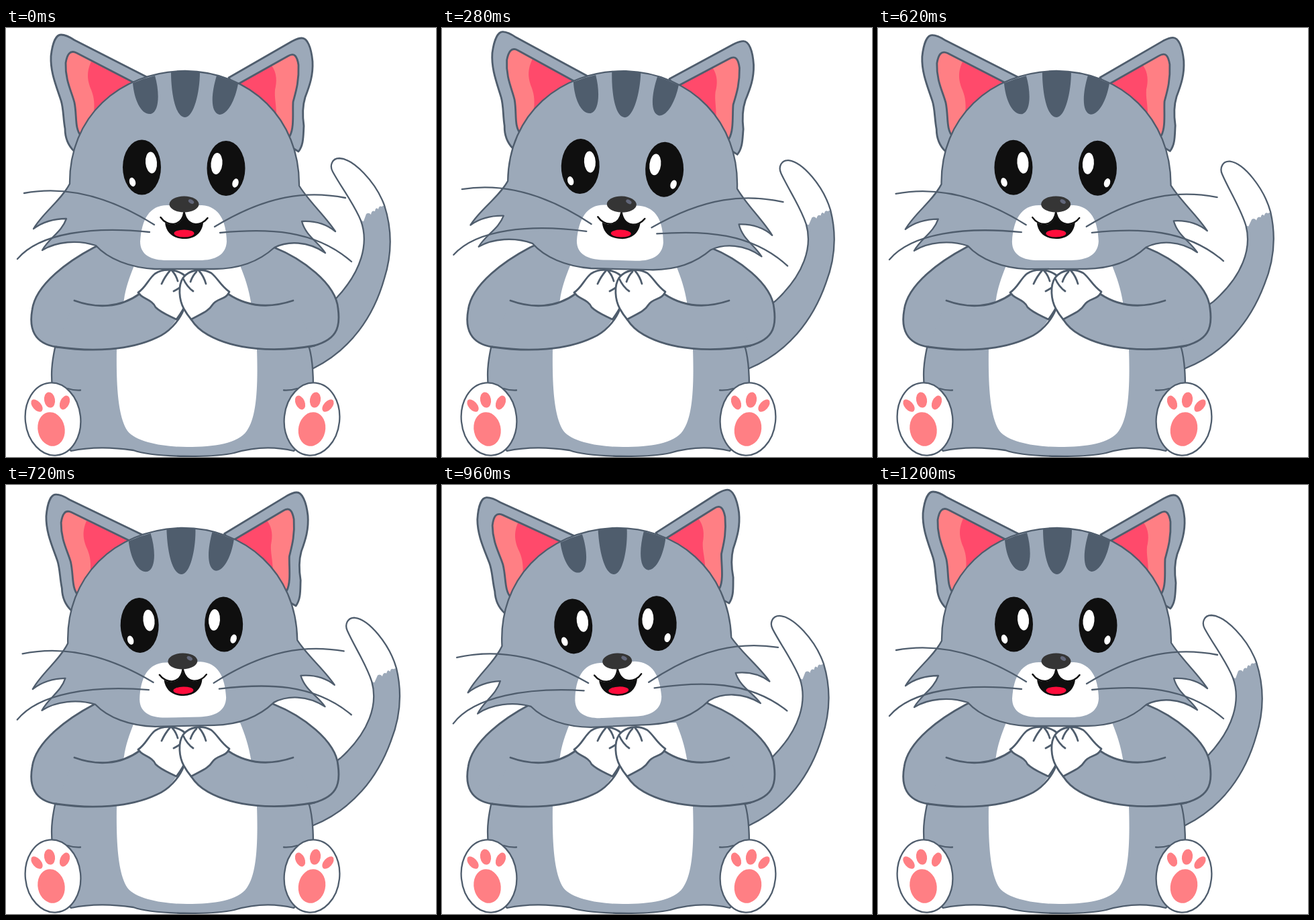
An HTML page for the animation above (1220 ms loop, 641 by 639 pixels).

```html
<!DOCTYPE html>
<html lang="en">
<head>
<meta charset="utf-8">
<title>Happy cat</title>
<style>
html, body { margin: 0; width: 100%; height: 100%; overflow: hidden; background: #fff; }
svg { display: block; width: 100%; height: 100%; }
.g { fill: #9ca9b9; }
.w { fill: #fff; }
.d { fill: #4f5d6d; }
.p { fill: #ff7f84; }
.r { fill: #ff4a6b; }
.k { fill: #0f0f0f; }
.l { stroke: #4f5d6d; stroke-width: 2.3; stroke-linejoin: round; stroke-linecap: round; }
.b { stroke-width: 2.8; }
.n { fill: none; }
</style>
</head>
<body>
<svg viewBox="0 0 641 639">
  <g id="tail">
    <path class="g" d="M458 507C514 479 548 430 564 373C576 335 575 298 564 264L556 250L520 270L529 287C541 320 531 362 491 404L430 450Z"/>
    <path class="w" d="M564 264C551 229 518 195 497 194C486 194 482 205 487 214C500 238 519 262 529 287L533 288L537 277Q541 274 544 278Q545 271 550 273Q551 266 555 270Q556 264 560 266Z"/>
    <path class="l n" d="M458 507C514 479 548 430 564 373C576 335 575 298 564 264C551 229 518 195 497 194C486 194 482 205 487 214C500 238 519 262 529 287C541 320 531 362 491 404L470 422"/>
  </g>

  <g id="body">
    <path class="g l" d="M73 476C68 500 67 515 69 535V600L97 630C130 623 160 625 190 629C220 640 310 640 340 633C370 624 400 623 429 630L458 600V535C458 510 456 490 452 476L400 340H131Z"/>
    <path class="g l b" d="M148 319L131 327C95 346 44 381 39 420C34 448 42 470 75 475L452 475C493 466 499 447 495 418C492 380 440 343 400 327L383 319Z"/>
    <path class="g" d="M78 460H450V485H78Z"/>
    <path class="w" d="M191 354C184 371 178 389 176 404Q169 444 165 478C164 540 168 580 181 600C194 617 235 624 270 624C310 624 346 619 359 600C373 580 376 540 374 478Q371 440 365 408C362 389 356 371 349 354Z"/>
    <path class="l n" d="M92 537Q101 540 111 539.500M434 537Q425 540 414 539.500"/>
  </g>

  <g id="arms">
    <path class="g" d="M102 406C135 418 170 415 198 396L254 434C246 447 236 456 225 461C185 480 130 482 75 475Z"/>
    <path class="w l b" d="M197 394C208 387 213 373 222 366C236 357 258 359 270 372L270 408Q262 424 254 434C240 427 231 424 223 416C218 404 203 404 197 394Z"/>
    <path class="l b n" d="M102 406C135 418 170 417 199 396M265 419C258 437 242 454 225 461C185 480 130 483 75 475"/>
    <path class="l b n" d="M244 362Q237 370 232 381M248 362Q254 369 256 377M267 375C264 384 258 388 250 392"/>
    <path class="g" d="M428 406C395 417 362 415 332 396L276 434C283 445 290 451 301 457C340 479 400 484 460 473Z"/>
    <path class="w l b" d="M333 393C320 384 316 373 306 365C292 357 273 360 264 372C256 384 258 405 265 418Q270 427 276 434C290 426 302 422 308 412C315 402 328 405 333 393Z"/>
    <path class="l b n" d="M428 406C395 417 362 417 331 396M276 434C283 445 290 451 301 457C340 479 400 484 460 473"/>
    <path class="l b n" d="M264 373Q270 386 279 392M284 363Q278 369 275 378M288 362Q295 370 298 381"/>
  </g>

  <g id="feet"></g>

  <g id="head">
    <path class="g l b" d="M101 183C92 174 88 163 88 150C85 134 86 121 82 108C74 84 66 65 67 42C69 24 74 10 82 10C89 10 96 14 102 18L212 74L150 150Z"/>
    <path class="g l b" d="M436 184C444 174 443 160 444 146C442 132 442 116 446 103C453 85 458 70 457 50C455 28 449 15 441 15C435 15 430 18 426 20L332 74L380 150Z"/>
    <path class="p" d="M112 161C102 150 106 131 102 111C98 95 88 78 89 52C91 40 95 32 105 37L192 82Z"/>
    <path class="r" d="M127 50C119 67 122 80 127 92C132 105 132 113 131 130L192 90V82Z"/>
    <path class="l b n" d="M112 161C102 150 106 131 102 111C98 95 88 78 89 52C91 40 95 32 105 37L192 82"/>
    <path class="p" d="M423 161C430 148 427 125 428 110C432 95 437 80 436 55C434 42 430 36 420 42L345 84Z"/>
    <path class="r" d="M396 56C404 67 404 80 401 92C400 105 403 113 403 130L345 92V84Z"/>
    <path class="l b n" d="M423 161C430 148 427 125 428 110C432 95 437 80 436 55C434 42 430 36 420 42L345 84"/>
    <path class="g l" d="M95 232C94 133 168 65 267 64C364 65 438 135 437 235C452 259 476 280 491 303C475 290 458 287 441 288C447 310 465 318 476 335C450 317 420 317 400 327C378 347 350 359 310 359H222C185 357 152 344 134 324C107 315 75 318 54 331C64 313 83 304 90 284C73 284 56 288 41 299C55 275 82 257 95 232Z"/>
    <path class="d" d="M189 82Q205 75 222 71C229 95 229 124 216 128C201 130 191 106 189 82ZM246 65Q267 63 289 66C289 95 280 133 267 133C252 133 246 95 246 65ZM314 71Q331 76 346 83C342 106 331 129 318 129C304 126 306 97 314 71Z"/>
    <g id="eyes"></g>
    <path class="w" d="M200 318C202 285 214 264 240 264H292C318 266 328 287 329 318C328 338 312 346 288 346H240C216 346 200 338 200 318Z"/>
    <path class="k" d="M237 290C249 296 261 293 265.500 278C271 293 283 296 294 290C292 306 281 314 266 314C250 314 239 306 237 290Z"/>
    <path class="n" stroke="#0f0f0f" stroke-width="2.4" stroke-linecap="round" d="M230.500 282C240 296 262 297 265.500 274C270 297 291 296 300.500 283"/>
    <ellipse cx="265.500" cy="306" rx="15" ry="5.500" fill="#ff0d3c"/>
    <ellipse cx="265.500" cy="262.500" rx="22" ry="12" fill="#353535"/>
    <ellipse cx="276" cy="258.500" rx="4.500" ry="2.800" fill="#62677a" transform="rotate(30 276 258.500)"/>
    <path class="l n" d="M27 246C75 237 140 242 221 293M17 344C50 305 130 295 214 304M311 296C390 248 450 242 506 253M319 305C390 298 460 300 515 348"/>
  </g>
</svg>
<script>
const el = id => document.getElementById(id);
const oval = (cls, x, y, rx, ry, a = 0) =>
  `<ellipse class="${cls}" cx="${x}" cy="${y}" rx="${rx}" ry="${ry}" transform="rotate(${a} ${x} ${y})"/>`;

// s is 1 for the left side and -1 for its mirror image
const foot = (x, s, pad) =>
  oval('w l', x, 582.5, 41.2, 54.2, -6 * s) +
  oval('p', pad, 597.5, 20, 25.5, -12 * s) +
  oval('p', x - 24 * s, 562.5, 6.3, 11, -42 * s) +
  oval('p', x - 5 * s, 554, 8, 11.7, -10 * s) +
  oval('p', x + 17.5 * s, 558, 6.8, 11, 24 * s);

const eye = (x, y, s) =>
  oval('k', x, y, 28.5, 41) +
  oval('w', x + 14 * s, y - 7, 8.5, 16, -5 * s) +
  oval('w', x - 14 * s, y + 22, 4.5, 6.8, -18 * s);

el('feet').innerHTML = foot(70, 1, 67.5) + foot(456, -1, 456);
el('eyes').innerHTML = eye(202.5, 207.5, 1) + eye(328, 209, -1);

const LOOP = 1220, STEP = 20;
const tilt = [[0, 0], [260, 1.45], [480, 0.63], [620, -0.22], [820, -2.42], [890, -2.9], [960, -2.65], [1200, 0], [1220, 0]];
const sway = [[0, 0], [280, 3.6], [480, 5.7], [520, 5.9], [620, 5.1], [820, 3.3], [960, 1.15], [1100, 0.08], [1200, 0], [1220, 0]];

// Slope at a key; flat at turning points and ends
function slope(keys, i) {
  if (i === 0 || i === keys.length - 1) return 0;
  const [[t0, v0], [t1, v1], [t2, v2]] = keys.slice(i - 1, i + 2);
  const a = (v1 - v0) / (t1 - t0), b = (v2 - v1) / (t2 - t1);
  return a * b <= 0 ? 0 : 2 * a * b / (a + b);
}

function at(keys, t) {
  const i = Math.max(0, keys.findIndex(k => k[0] > t) - 1);
  const [t0, v0] = keys[i], [t1, v1] = keys[i + 1];
  const h = t1 - t0, u = (t - t0) / h, e = u * u * (3 - 2 * u);
  return v0 + (v1 - v0) * e
    + h * u * (1 - u) * ((1 - u) * slope(keys, i) - u * slope(keys, i + 1));
}

function draw(ms) {
  const t = Math.floor((ms % LOOP) / STEP) * STEP;
  el('head').setAttribute('transform', `rotate(${at(tilt, t)} 262 355)`);
  el('tail').setAttribute('transform', `rotate(${at(sway, t)} 458 508)`);
}

let start;
function tick(now) {
  start ??= now;
  draw(now - start);
  requestAnimationFrame(tick);
}
draw(0);
requestAnimationFrame(tick);
</script>
</body>
</html>
```
